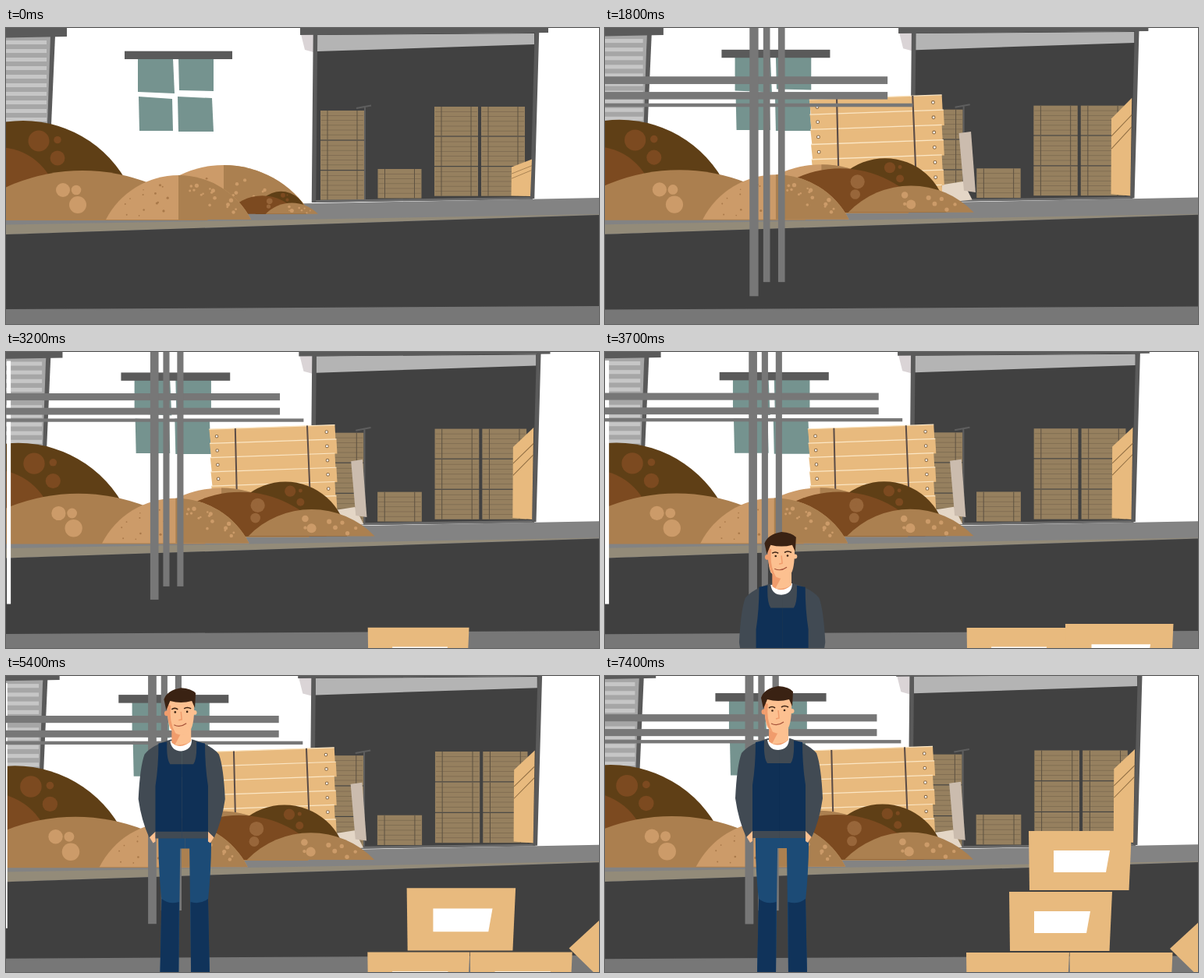
Animation of 760 by 380 pixels, one loop 7500 ms. Source, as an HTML page:

```html
<!DOCTYPE html>
<html lang="en">
<head>
<meta charset="utf-8">
<title>Warehouse yard</title>
<style>
  html, body { margin: 0; width: 100%; height: 100%; overflow: hidden; background: #fff; }
  svg { display: block; width: 100%; height: 100%; }
</style>
</head>
<body>
<svg id="stage" viewBox="0 0 760 380"></svg>
<script>
const LOOP = 7500, STEP = 100;
const CX = 505, CY = 285, ZOOM = 0.00405, END = 1.03;

const GREY = '#5a5a5a', PIPE = '#777', ROAD = '#404040', TEAL = '#75938f', WOOD = '#e8ba7e';
const SAND = '#cc9b69', CLAY = '#ab8050', DARK = '#5f3f16', BROWN = '#7c4a20';

// Shape helpers
const poly = (fill, pts) => `<polygon fill="${fill}" points="${pts}"/>`;
const rect = (fill, x, y, w, h) => `<rect fill="${fill}" x="${x}" y="${y}" width="${w}" height="${h}"/>`;
const disc = (fill, x, y, r) => `<circle fill="${fill}" cx="${x}" cy="${y}" r="${r}"/>`;
const path = (fill, d) => `<path fill="${fill}" d="${d}"/>`;
const line = (color, w, d) => `<path fill="none" stroke="${color}" stroke-width="${w}" d="${d}"/>`;
const group = (id, body) => `<g id="${id}">${body}</g>`;
const mirror = (x, body) => [1, -1].map(s => `<g transform="translate(${x} 0) scale(${s} 1)">${body}</g>`).join('');
const range = (n, f) => Array.from({ length: n }, (_, i) => f(i)).join('');

// Circular caps: x is the middle, y the foot, w half the width, h the height
const bow = (w, h) => (w * w + h * h) / (2 * h);
const cap = (fill, x, y, w, h) => path(fill, `M${x - w} ${y}A${bow(w, h)} ${bow(w, h)} 0 0 1 ${x + w} ${y}Z`);
const half = (fill, x, y, w, h) => path(fill, `M${x} ${y - h}A${bow(w, h)} ${bow(w, h)} 0 0 1 ${x + w} ${y}H${x}Z`);

let seed = 7;
const rnd = () => (seed = (seed * 16807) % 2147483647) / 2147483647;

// Specks scattered over one side of a cap
const specks = (fill, n, side, size, x, y, w, h) => range(n, () => {
  const a = 0.15 + rnd() * 1.25, d = 0.25 + 0.6 * Math.sqrt(rnd());
  return disc(fill, x + side * w * d * Math.cos(a), y - h * d * Math.sin(a), size * (0.5 + rnd() * 0.6));
});

function splitHeap(...at) {
  return cap(SAND, ...at) + half(CLAY, ...at) +
    specks('#a9794a', 14, -1, 1.5, ...at) + specks(SAND, 16, 1, 2.4, ...at);
}

// Two big craters and a small one
const craters = (fill, x, y, r, dx, dy) =>
  disc(fill, x, y, r) + disc(fill, x + dx, y + dy, r * 0.7) + disc(fill, x + dx, y - r * 0.1, r * 0.35);

const shed = () => rect('#a6a6a6', -30, 10, 87, 114) +
  range(10, i => rect('#c6c6c6', -30, 16 + i * 11, 82, 5)) +
  poly(GREY, '57,10 63,10 58,124 53,124') + poly(GREY, '-30,-20 78,-20 78,11 -30,13');

const windowPanes = () => poly(TEAL, '169,39 214,39 216,84 169,82') + poly(TEAL, '221,39 266,39 266,81 222,80') +
  poly(TEAL, '170,88 213,91 214,132 171,132') + poly(TEAL, '220,88 264,90 266,133 221,133') +
  rect(GREY, 152, 29.7, 138, 10.3);

const dimBox = (x, y) => rect('#96805f', x, y, 56, 37.5) +
  range(5, i => rect('#7d6a50', x + 1, y + 6 + i * 6.2, 54, 0.8)) +
  line('#5e5242', 1, `M${x + 9} ${y}v37.5M${x + 47} ${y}v37.5`);
const dimStack = (x, y) => range(3, i => dimBox(x, y + i * 38.6));

const warehouse = () => poly('#414141', '396,8 680,6 674,219 396,224') +
  poly('#b4b4b4', '399,9 677,7 677,21 399,30') + poly('#dad4d6', '378,8 394,8 394,31 383,28') +
  dimStack(403, 106) + dimBox(476.5, 181) + dimStack(549, 101) + dimStack(609, 101) +
  line('#5e5e5e', 2, 'M449 103L468 99.5M460 102V220') +
  line('#696969', 3, 'M396 222.5L675 218.5') +
  line(GREY, 5.5, 'M396.5 4L394.5 224M680.5 4L674.5 219') + poly(GREY, '377,-20 695,-20 695,6 377,9');

const sideCrate = () => poly(WOOD, '648,124 674,99.5 672,216 647.5,214') +
  line('#8f6d42', 1, 'M648 145L674 119.5M648 160L673.5 134');

const ground = () => poly('#838383', '-30,232 397,225 790,217.5 790,243 -30,266') +
  poly('#938b79', '-30,253 790,238.5 -30,266') + poly(ROAD, '-30,266 790,239 790,400 -30,400') +
  poly('#777', '-30,361.2 790,356.8 790,420 -30,420');

const frontCrate = () => poly('#e4d6c6', '423,204 448,200 459,222 420,226') +
  poly('#cbbcae', '443,142 457.5,140 463,213 449,211') +
  range(7, i => {
    const y = 101.5 + i * 18, l = 263.5 + i * 0.7, r = 422.5 + i % 2 * 2;
    const nail = (x, y) => `<circle cx="${x}" cy="${y}" r="1.8" fill="#fff" stroke="#8a6a45"/>`;
    return poly(WOOD, `${l},${y} ${r},${y - 5.5} ${r + 1},${y + 13} ${l + 2},${y + 18.5}`) +
      line('#fbe6c4', 1.2, `M${l} ${y}L${r} ${y - 5.5}`) + nail(l + 9.5, y + 9) + nail(412 + i * 0.6, y + 3.5);
  }) + line('#5c4d47', 2, 'M296.5 100.5L299 205M387.5 97L392 205');

const leftHeap = () => cap(DARK, 22, 215, 141, 96) + craters(BROWN, 42, 145, 13.5, 24, 22) +
  cap(BROWN, -10, 215, 75, 62) + cap('#ab7f4f', 98, 247, 161, 64) + craters(SAND, 73, 208, 9, 17, 0) +
  disc(SAND, 92, 227, 11);

const darkHeap = () => cap(DARK, 360, 237, 78, 69) + craters(BROWN, 366, 180, 7, 13, 14) +
  cap(BROWN, 303, 237, 109, 56) + craters('#98663a', 325, 198, 9, -3, 16);

const clayHeap = () => cap(CLAY, 393, 237, 80, 34) + craters(SAND, 393, 227, 6, -8, -12) +
  specks(SAND, 5, 1, 3.2, 393, 237, 80, 34);

const pipes = () => rect('#fff', 7.5, 15, 5, 308) + rect('#fff', -17, 15, 5, 308) +
  rect(PIPE, -500, 56, 853, 9) + rect(PIPE, -500, 74.4, 853, 8.8) + rect(PIPE, -500, 88, 883, 4.2) +
  rect(PIPE, 189, -90, 10.5, 407.5) + rect(PIPE, 205.3, -90, 8, 390.7) + rect(PIPE, 223, -90, 8, 390.7);

function man() {
  const skin = '#fcc090', shade = '#f09c6c', ink = '#3a2213';
  const leg = path('#1c4b76', 'M0 196H34Q35 240 30 288L32 384H8L6 221H0Z') +
    path('#10335a', 'M7.5 290Q20 294 30 286L32 384H8Z');
  const side = path(skin, 'M34 198L43 204L37 214L34 212Z') +
    path('#414a53', 'M0 80H14Q38 87 48 99Q54 115 56 157Q52 185 42 207L34 199V208H0Z') +
    path('#0f3056', 'M0 112H15Q20 105 19 83L30 85Q30 115 34 140V199H0Z');
  return mirror(227, leg) + mirror(223, side) +
    path('#fff', 'M208 82L236 80Q236 94 222 95Q210 95 208 82Z') +
    path(shade, 'M210 60H235V82Q222 94 210 84Z') + path(skin, 'M222 72L235 66V82Q228 88 214 87Z') +
    disc(shade, 204, 46, 3.5) + disc(skin, 239.5, 45, 3) +
    path(skin, 'M204 28H239Q240 60 234 68L226 74Q216 75 208 66Q204 56 204 28Z') +
    path(shade, 'M204 34L209 36Q206 56 215 72Q204 66 204 34Z') +
    path(ink, 'M203 42L200 28Q204 16 222 13Q236 14 241 20L240 39L236 30Q222 34 208 30Z') +
    line(ink, 1.6, 'M210 41Q214 38 218 41M226 40Q230 37 235 40') +
    disc(ink, 214.5, 44.5, 1.3) + disc(ink, 230, 44, 1.3) +
    line(shade, 1.5, 'M222 44L223 54L219 55') + line('#a5523a', 1.2, 'M213 61Q221 65 229 59');
}

const box = id => group(id, poly(WOOD, '-66,-76 66,-76 62.5,0 -65,0') +
  poly('#fff', '-34,-51 38,-51 33,-23 -34,-23'));

// id, middle and foot, start
const BOXES = [['boxA', 529, 431, 2], ['boxB', 661.5, 431, 3], ['boxC', 584, 353, 4.7], ['boxE', 609, 275, 5.6]];

document.getElementById('stage').innerHTML =
  group('back', shed() + windowPanes() + warehouse() + group('sideCrate', sideCrate()) + ground() +
    group('crate', frontCrate()) + leftHeap() + splitHeap(279, 238, 111, 62) + group('darkHeap', darkHeap()) +
    splitHeap(221, 246, 93, 57) + group('clayHeap', clayHeap()) + group('pipes', pipes())) +
  group('front', group('man', man()) + BOXES.map(b => box(b[0])).join('') +
    group('boxD', poly(WOOD, '724,350 775,303 822,350 771,396')));

const el = {};
document.querySelectorAll('g[id]').forEach(g => el[g.id] = g);

// Damped swing from 0 past 1 and back, at rest after 1.8 units
function pop(t, start, unit = 1) {
  const a = Math.min(1.8, Math.max(0, (t - start) / unit));
  return 1 - Math.cos(1.65 * a) * (1 - a / 1.8) ** 1.6;
}
const set = (id, value) => el[id].setAttribute('transform', value);
const scaleAt = (id, x, y, sx, sy = sx) => set(id, `translate(${x} ${y}) scale(${sx} ${sy}) translate(${-x} ${-y})`);

function pose(t) {
  const zoom = 1 + ZOOM * t;
  scaleAt('back', CX, CY, zoom);
  scaleAt('front', CX, CY, zoom / END);

  const heap = pop(t, -0.36);
  scaleAt('darkHeap', 347, 240, heap);
  scaleAt('clayHeap', 347, 240, heap);
  scaleAt('sideCrate', 672, 216, 1, pop(t, -0.7, 2));
  scaleAt('crate', 263, 238, pop(t, 0.4));
  scaleAt('pipes', 209, -55, pop(t, 0.97, 0.65));

  set('man', `translate(0 ${380 * (1 - pop(t, 3.48, 0.6))})`);
  for (const [id, x, y, start] of BOXES) set(id, `translate(${x} ${y}) scale(${pop(t, start, 0.6)})`);
  scaleAt('boxD', 773, 350, pop(t, 4.4, 0.6));
}

const begin = performance.now();
function tick(now) {
  const ms = Math.max(0, now - begin) % LOOP;
  pose(Math.floor(ms / STEP) * STEP / 1000);
  requestAnimationFrame(tick);
}
pose(0);
requestAnimationFrame(tick);
</script>
</body>
</html>
```
